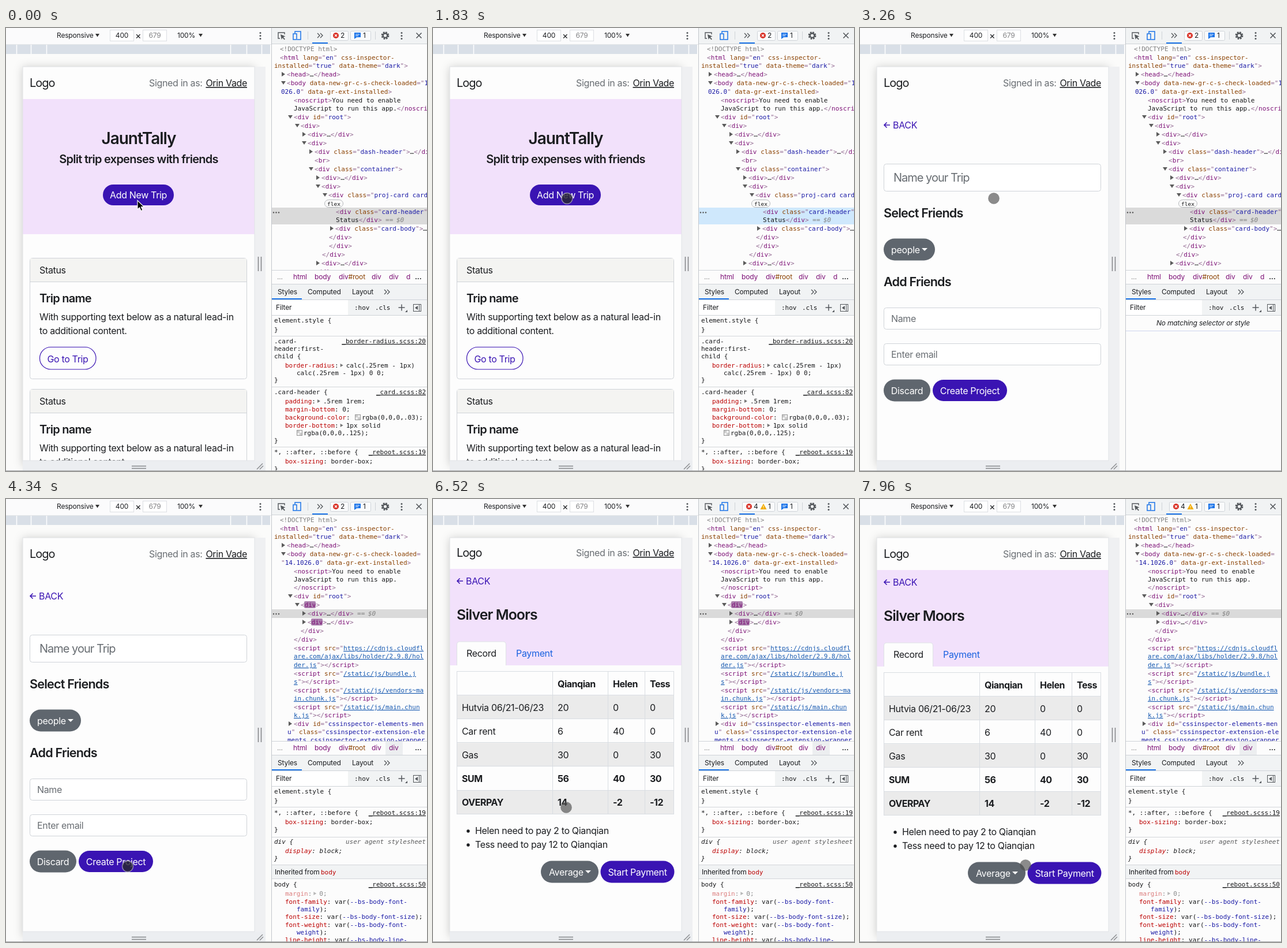
An HTML page for the animation above (8 s loop, 730 px wide and 767 px high).

```html
<!DOCTYPE html>
<html lang="en">
<head>
<meta charset="utf-8">
<title>Trip expenses demo</title>
<style>
html, body { margin: 0; width: 100%; height: 100%; overflow: hidden; background: #fcfcfc; }
svg { display: block; width: 730px; height: 767px; }
text { font: 16px Inter, sans-serif; letter-spacing: -.021em; white-space: pre; fill: #1b1d20; }
.c { text-anchor: middle; }
.e { text-anchor: end; }
.big { font-size: 20px; letter-spacing: -.05em; }
.h { font-weight: 600; letter-spacing: -.037em; }
.b { font-weight: 700; letter-spacing: -.03em; }
.w { fill: #fff; }
.grey { fill: #686d72; }
.ink { fill: #3a14b3; }
.s { font-size: 12px; letter-spacing: -.014em; }
.m { font: 11px "DejaVu Sans Mono", monospace; letter-spacing: 0; fill: #17181a; }
.i { font-style: italic; }
.u { text-decoration: underline; }
.p { fill: #7d1076; } .q { fill: #936a92; } .a { fill: #8a4000; } .v { fill: #1a1aa6; }
.k { fill: #808080; } .l { fill: #1558b0; text-decoration: underline; } .r { fill: #bc0000; } .t { fill: #17181a; }
</style>
</head>
<body>
<script>
const INK = '#3a14b3', SLATE = '#5f666e', EDGE = '#cfd3d8', BAR = '#f1f3f4', BLUE = '#1a73e8', ICON = '#54585c';

const esc = s => s.replace(/&/g, '&amp;').replace(/</g, '&lt;').replace(/>/g, '&gt;');
const text = (x, y, s, cls = '', attrs = '') => `<text x="${x}" y="${y}" class="${cls}" ${attrs}>${s}</text>`;
const rect = (x, y, w, h, fill, attrs = '') => `<rect x="${x}" y="${y}" width="${w}" height="${h}" fill="${fill}" ${attrs}/>`;
const path = (d, fill, attrs = '') => `<path d="${d}" fill="${fill}" ${attrs}/>`;
const line = (d, color = EDGE, w = 1) => path(d, 'none', `stroke="${color}" stroke-width="${w}"`);
const dot = (x, y, r, fill) => `<circle cx="${x}" cy="${y}" r="${r}" fill="${fill}"/>`;
const group = (id, body, attrs = '') => `<g id="${id}" ${attrs}>${body}</g>`;
const box = (x, y, w, h, fill = '#fff', r = 4, stroke = EDGE) =>
  rect(x + .5, y + .5, w - 1, h - 1, fill, `rx="${r}" stroke="${stroke}"`);
const pill = (x, y, w, h, fill) => rect(x, y, w, h, fill, `rx="${h / 2}"`);
const down = (x, y, w, fill) => path(`M${x} ${y}h${w}l${-w / 2} ${w * .8}z`, fill);
const caret = (x, y) => path(`M${x} ${y}h10l-5 5z`, '#fff');
const dots = (x, y) => [-5, 0, 5].map(d => dot(x, y + d, 1.5, ICON)).join('');

// "^x" switches the colour class; punctuation inside tags is paler.
const span = (cls, s) => `<tspan class="${cls}">${esc(s)}</tspan>`;
const paint = (cls, s) => cls !== 'p' ? span(cls, s) :
  s.replace(/[<>\/="]+|[^<>\/="]+/g, w => span(/[<>\/="]/.test(w) ? 'q' : 'p', w));
const code = (x, cy, src, base = 't', cls = '') => text(x, cy + 4,
  (base + src).split('^').map(part => paint(part[0], part.slice(1))).join(''), 'm ' + cls);
const fold = (x, cy, open) => path(open ? `M${x} ${cy - 3}h8l-4 6z` : `M${x + 1} ${cy - 4}l6 4l-6 4z`, '#5c5c5c');
const tree = rows => rows.map(([x, cy, mark, src]) =>
  (mark ? fold(x - 10, cy, mark === 'd') : '') + code(x, cy, src, 'p')).join('');
const more = '^t…^p</div>';
const div = '<div>' + more;
const classed = name => `<div ^aclass^p="^v${name}^p">`;

/* Browser chrome around the page */
function chrome() {
  const cuts = [18, 43, 70, 389, 417, 443];
  return rect(0, 0, 460, 28, '#fbfbfc') + line('M0 28.5H460', '#e4e6e8') +
    text(88, 17, 'Responsive', 's') + down(155, 10, 7, '#333') +
    box(180, 3, 42, 20, '#fff', 0, '#dcdfe3') + text(201, 17, '400', 's c') +
    text(229, 19, '×', 'c') +
    box(237, 3, 42, 20, '#fff', 0, '#dcdfe3') + text(258, 17, '679', 's c', 'fill-opacity=".55"') +
    text(297, 17, '100%', 's') + down(334, 10, 7, '#333') + dots(441, 13.5) +
    rect(0, 29, 458, 16, '#d9dfe7') + line(cuts.map(x => `M${x + .5} 29v16`).join(''), '#fff', 1.5) +
    rect(0, 45, 460, 722, '#fbfbfa') +
    rect(29, 67, 402, 690, '#fff', 'style="filter:drop-shadow(0 1px 8px #0003)"') +
    rect(431, 67, 19, 700, '#eff0f2') + rect(29, 749, 421, 18, '#eceef1') +
    line('M437.5 396v25M442.5 396v25M218 758.5h25M218 762.5h25', '#85878a', 1.6) +
    line('M435 764l10-10M440 764l6-6', '#8f9194', 1.5);
}

/* Screens of the app */
const header = text(41, 102, 'Logo', 'big') + text(248, 101, 'Signed in as:', 'grey') +
  text(418, 101, 'Orin Vade', 'e u');
const back = y => line(`M52 ${y}H42m4.5-4.5l-4.5 4.5l4.5 4.5`, INK, 1.6) + text(57, y + 6, 'BACK', 'ink');
const hero = h => rect(29, 123, 402, h, '#f2e1fb');

function card(y) {
  return box(41, y, 377, 210, '#fdfdfd') +
    rect(42, y + 1, 375, 40, '#f4f4f2') + line(`M41 ${y + 41.5}h377`) +
    text(58, y + 27, 'Status') + text(58, y + 77, 'Trip name', 'big h') +
    text(58, y + 108, 'With supporting text below as a natural lead-in') +
    text(58, y + 132, 'to additional content.') +
    rect(58.5, y + 154.5, 97.5, 38.5, 'none', `rx="19" stroke="${INK}" stroke-width="1.2"`) +
    text(107, y + 180.5, 'Go to Trip', 'c ink');
}

const home = header + hero(234) +
  text(230, 201, 'JauntTally', 'c h', 'style="font-size:28px"') +
  text(230, 234, 'Split trip expenses with friends', 'c h', 'style="font-size:20px"') +
  pill(168, 271, 123, 36, INK) + text(229.5, 295, 'Add New Trip', 'c w') +
  card(398) + card(625);

const form = header + back(168) +
  box(41, 235, 377, 48) + text(58, 266, 'Name your Trip', 'big grey') +
  text(41, 328, 'Select Friends', 'h', 'style="font-size:21.6px"') +
  pill(41, 364.5, 89, 38, SLATE) + text(54, 390, 'people', 'w') + caret(107, 381) +
  text(41, 447, 'Add Friends', 'h', 'style="font-size:21.6px"') +
  box(41, 484, 377, 38) + text(54, 509, 'Name', 'grey') +
  box(41, 546, 377, 38) + text(54, 571, 'Enter email', 'grey') +
  pill(41, 608.5, 81, 38, SLATE) + text(81.5, 634, 'Discard', 'c w') +
  pill(126, 609, 129, 37, INK) + text(190.5, 634, 'Create Project', 'c w');

function record() {
  const rows = [['', 'Qianqian', 'Helen', 'Tess'], ['Hutvia 06/21-06/23', 20, 0, 0], ['Car rent', 6, 40, 0],
    ['Gas', 30, 0, 30], ['SUM', 56, 40, 30], ['OVERPAY', 14, -2, -12]];
  const cols = [41, 207, 303, 367, 417], top = i => 301 + i * 41.1;
  const cells = rows.map((row, i) =>
    (i % 2 ? rect(41, top(i), 377, 41, '#ebebeb') : '') +
    row.map((v, j) => text(cols[j] + 9, top(i) + 26.5, v, i % 4 === 0 || i === 5 ? 'b' : '')).join('')).join('');
  const grid = cols.map(x => `M${x + .5} 300.5V547.5`).join('') +
    [...rows, 0].map((_, i) => `M41 ${Math.round(top(i)) - .5}H418`).join('');
  return header + hero(167) + back(144) +
    text(41, 210.5, 'Silver Moors', 'h', 'style="font-size:24.8px"') +
    path('M41.5 291v-37q0-5 5-5h75q5 0 5 5v37z', '#fdfdfd', 'stroke="#dee2e6"') +
    rect(41, 290, 87, 3, '#fdfdfd') +
    text(58, 275, 'Record') + text(144, 275, 'Payment', '', 'style="fill:#1a62e0"') +
    cells + line(grid, '#d9dde2') +
    dot(61, 577, 2.7, '#1b1d20') + text(73, 582, 'Helen need to pay 2 to Qianqian') +
    dot(61, 601, 2.7, '#1b1d20') + text(73, 606, 'Tess need to pay 12 to Qianqian') +
    pill(187, 628.5, 100, 38, SLATE) + text(201, 653.5, 'Average', 'w') + caret(264, 645) +
    pill(290.5, 628.5, 128, 38, INK) + text(354.5, 653.5, 'Start Payment', 'c w');
}

/* Developer tools */
const chevrons = (x, y) => line(`M${x} ${y - 4}l4 4l-4 4M${x + 5} ${y - 4}l4 4l-4 4`, ICON, 1.4);
const errorMark = x => dot(x, 13, 5, '#d93025') + line(`M${x - 2} 11l4 4m0-4l-4 4`, '#fff', 1.2);

const toolbar = rect(461, 0, 269, 27, BAR) + line('M461 27.5H730') +
  line('M475 18h-3V8h11v3', ICON, 1.4) + path('M476 11l8.5 3.6l-3.6 1.2l3 3.4l-1.3 1.2l-3-3.4l-1.8 3z', ICON) +
  line('M501 9V6h10v14h-6', BLUE, 1.5) + rect(498, 10, 6, 10, BAR, `stroke="${BLUE}" stroke-width="1.5"`) +
  line('M523.5 6v14M640.5 6v14') + rect(531, 25, 27, 2, BLUE) +
  box(597, 5, 36, 17, '#fafbfc', 2) + path('M604 8h11v8h-7l-4 3z', BLUE) +
  line('M606 11h7M606 13.5h5', '#fff') + text(619, 17, '1', 's') +
  `<circle cx="657.5" cy="13" r="5.6" fill="none" stroke="${ICON}" stroke-width="2.6" stroke-dasharray="2.7 1.7"/>` +
  `<circle cx="657.5" cy="13" r="3.8" fill="none" stroke="${ICON}" stroke-width="2.4"/>` +
  dots(686, 13.5) + line('M711.5 8.5l9 9m0-9l-9 9', ICON, 1.6);
const fewErrors = chevrons(540, 13) + box(562, 5, 32, 17, '#fafbfc', 2) + errorMark(572) + text(580, 17, '2', 's');
const manyErrors = box(536, 5, 57, 17, '#fafbfc', 2) + errorMark(548) + text(556, 17, '4', 's') +
  path('M573 8l5.5 10h-11z', '#f2ab00') + line('M573 11.5v3m0 1v1', '#fff') + text(581, 17, '1', 's');

const treeHead = [
  [475, 36, '', '^k<!DOCTYPE html>'],
  [475, 51, '', '<html ^alang^p="^ven^p" ^acss-inspector-'],
  [465, 65, '', '^ainstalled^p="^vtrue^p" ^adata-theme^p="^vdark^p">'],
  [487, 80, 'r', '<head>^t…^p</head>'],
  [499, 125, '', '<noscript>^tYou need to enable']];
const ellipsis = y => [464, 468.5, 473].map(x => dot(x, y, 1.2, '#555')).join('');

const homeTree = rect(461, 311, 269, 29, '#dadada', 'id="selection"') + ellipsis(319.5) + tree([...treeHead,
  [487, 95, 'd', '<body ^adata-new-gr-c-s-check-loaded^p="^v14.1'],
  [477, 110, '', '^v026.0^p" ^adata-gr-ext-installed^p>'],
  [499, 139, '', '^tJavaScript to run this app.^p</noscript>'],
  [499, 154, 'd', '<div ^aid^p="^vroot^p">'],
  [511, 169, 'd', '<div>'], [523, 184, 'r', div], [523, 199, 'd', '<div>'],
  [535, 214, 'r', classed('dash-header') + more],
  [535, 229, '', '<br>'], [535, 244, 'd', classed('container')],
  [547, 259, 'r', div], [547, 274, 'd', '<div>'],
  [559, 289, 'd', classed('proj-card card')],
  [572, 318, '', classed('card-header')],
  [572, 332, '', '^tStatus^p</div>^k == '],
  [571, 347, 'r', classed('card-body') + '^t…'],
  [560, 362, '', '</div>'], [560, 377, '', '</div>'], [548, 392, '', '</div>'],
  [547, 407, 'r', div], [535, 422, '', '</div>']]) +
  code(677, 332, '$0', 'k', 'i') + box(552, 297, 33, 14, '#fafafa', 7, '#b5b8bb') +
  text(568.5, 307.5, 'flex', 'm c', 'style="font-size:9.5px"');

const link = '<script ^asrc^p="^l', close = '^p"></' + 'script>';
const flash = (x, cy) => rect(x + 6, cy - 6, 20, 12, '#894b8d', 'rx="2"');
const pageTree = rect(461, 191, 269, 15, '#dadada') + ellipsis(199) +
  group('flash', flash(511, 183) + flash(523, 213)) + tree([...treeHead,
  [487, 95, 'd', '<body ^adata-new-gr-c-s-check-loaded^p='],
  [477, 110, '', '"^v14.1026.0^p" ^adata-gr-ext-installed^p>'],
  [499, 139, '', '^tJavaScript to run this app.'], [499, 153, '', '</noscript>'],
  [499, 168, 'd', '<div ^aid^p="^vroot^p">'],
  [511, 183, 'd', '<div>'], [523, 198, 'r', div + '^k == '], [523, 213, 'r', div],
  [511, 228, '', '</div>'], [499, 243, '', '</div>'],
  [499, 258, '', link + 'https://cdnjs.cloudfl'],
  [499, 272, '', '^lare.com/ajax/libs/holder/2.9.8/hol'], [499, 287, '', '^lder.js' + close],
  [499, 302, '', link + '/static/js/bundle.j'], [499, 316, '', '^ls' + close],
  [499, 331, '', link + '/static/js/vendors~ma'], [499, 345, '', '^lin.chunk.js' + close],
  [499, 360, '', link + '/static/js/main.chun'], [499, 374, '', '^lk.js' + close],
  [499, 389, 'r', '<div ^aid^p="^vcssinspector-elements-men'],
  [488, 403, '', '^vu^p" ^aclass^p="^vcssinspector-extension-ele'],
  [488, 417, '', '^vments cssinspector-extension-wrapper']]) +
  code(628, 198, '$0', 'k', 'i') +
  group('flashText', code(517.6, 183, 'div', 'w') + code(529.6, 213, 'div', 'w'));

const crumbs = rect(461, 419, 269, 24, '#fcfcfc') + line('M461 419.5H730M461 443.5H730') +
  rect(658, 420, 30, 23, '#eceef0', 'id="crumb"') +
  text(470, 435, '...', 's k') + text(498, 435, 'html', 's p') + text(535, 435, 'body', 's p') +
  text(577, 435, 'div<tspan class="a">#root</tspan>', 's p') + text(634, 435, 'div', 's p') +
  text(664, 435, 'div', 's p') + text(694, 435, 'd', 's p', 'id="cutCrumb"') + text(709, 435, '...', 's b');

const tabs = rect(461, 444, 269, 54, BAR) + rect(461, 471, 132, 26, '#fff') +
  line('M461 470.5H730M461 497.5H730') + rect(461, 468, 52, 2, BLUE) +
  text(471, 461, 'Styles', 's') + text(523, 461, 'Computed', 's') + text(600, 461, 'Layout', 's') +
  chevrons(656, 457) + text(468, 488, 'Filter', 's') +
  code(604, 484, ':hov', 't', 'b') + code(640, 484, '.cls', 't', 'b') +
  line('M680.5 484h11M686 478.5v11', ICON, 1.5) + path('M696 488v4h-4z', ICON) +
  rect(706.5, 478.5, 13, 12, 'none', `stroke="${ICON}"`) + line('M716.5 479v11', ICON) + path('M714 481v7l-5-3.5z', ICON);

const rule = y => line(`M461 ${y + .5}H730`, '#d3d6da');
const brace = y => code(465, y, '}');
const source = (y, s) => text(728, y + 4, s, 'm e u');
const swatch = (x, y) => rect(x + .5, y - 4.5, 9, 9, '#eee', 'stroke="#999"') + path(`M${x + 1} ${y - 4}h4v4h4v4h-4v-4h-4z`, '#ccc');
const small = (x, cy) => path(`M${x} ${cy - 3}l5 3l-5 3z`, '#777');
const prop = (cy, name, value, gap = 0) => code(484, cy, `^r${name}^t:${gap ? '' : ' ' + value}`) +
  (gap ? small(484 + (name.length + 1) * 6.62 + 3, cy) + code(484 + (name.length + 1) * 6.62 + gap, cy, value) : '');
const varStart = s => `var(^v--bs-body-${s}`;
const inline = code(465, 506, 'element.style {') + brace(522) + rule(533);

const cardStyles = inline +
  code(465, 542, '.card-') + source(542, '_border-radius.scss:20') +
  code(465, 555, 'header:first-') + code(465, 568, 'child {') +
  prop(584, 'border-radius', 'calc(.25rem - 1px)', 13) + code(504, 597, 'calc(.25rem - 1px) 0 0;') + brace(609) + rule(621) +
  code(465, 630, '.card-header {') + source(630, '_card.scss:82') +
  prop(646, 'padding', '.5rem 1rem;', 13) + prop(660, 'margin-bottom', '0;') +
  prop(674, 'background-color', '') + swatch(605, 674) + code(617, 674, 'rgba(0,0,0,.03);') +
  prop(688, 'border-bottom', '1px solid', 13) + swatch(504, 701) + code(516, 701, 'rgba(0,0,0,.125);') + brace(714) + rule(725) +
  code(465, 734, '*, ::after, ::before {') + source(734, '_reboot.scss:19') +
  prop(750, 'box-sizing', 'border-box;') + brace(763);

const noStyles = text(595, 515, 'No matching selector or style', 's c i') + line('M461 524.5H730', '#cdd5ee');

const divStyles = inline +
  code(465, 543, '*, ::after, ::before {') + source(543, '_reboot.scss:19') +
  prop(559, 'box-sizing', 'border-box;') + brace(572) + rule(585) +
  code(465, 593, 'div {', 't', 'i') + text(728, 597, 'user agent stylesheet', 'm e i', 'fill-opacity=".7"') +
  code(484, 609, '^rdisplay^t: block;', 't', 'i') + code(465, 622, '}', 't', 'i') +
  rect(461, 633, 269, 25, BAR) + rule(633) + rule(657) +
  text(466, 650, 'Inherited from', 's') + code(546, 646, '^rbody') +
  code(465, 667, 'body {') + source(667, '_reboot.scss:50') +
  `<g opacity=".5">${prop(683, 'margin', '0;', 13)}</g>` +
  prop(697, 'font-family', varStart('font-')) + code(504, 710, '^vfamily^t);') +
  prop(723, 'font-size', varStart('font-size^t);')) +
  prop(737, 'font-weight', varStart('font-')) + code(504, 750, '^vweight^t);') +
  prop(763, 'line-height', varStart('line-'));

const tools = rect(461, 0, 269, 767, '#fcfcfc') +
  group('homeTree', homeTree, 'clip-path="url(#treeClip)"') + group('pageTree', pageTree, 'clip-path="url(#treeClip)"') +
  toolbar + group('fewErrors', fewErrors) + group('manyErrors', manyErrors) + crumbs + tabs +
  group('cardStyles', cardStyles) + group('noStyles', noStyles) + group('divStyles', divStyles) +
  line('M460.5 0V767', '#c3c7cc');

const arrow = path('M228 298.5v15.5l3.6-3.2l2.6 5.8l2.7-1.2l-2.5-5.6h5z', '#000', 'id="arrow" stroke="#fff" stroke-width="1.1"');

document.body.innerHTML = `<svg viewBox="0 0 730 767">
  <clipPath id="pageClip"><rect x="29" y="67" width="402" height="682"/></clipPath>
  <clipPath id="treeClip"><rect x="461" y="28" width="269" height="391"/></clipPath>
  ${chrome()}
  <g clip-path="url(#pageClip)">${rect(29, 67, 402, 682, '#fdfdfd')}
    ${group('home', home)}${group('form', form)}${group('record', record())}</g>
  ${rect(29, 67, 402, 682, 'none', 'stroke="#e1e3e6"')}
  ${tools}${line('M0 766.5H730', '#a2a4a6')}
  <circle id="touch" r="9.5"/>${arrow}</svg>`;

/* Timeline */
const LOOP = 8000;
const touchPath = [[0, 233, 295], [3280, 232, 295], [4100, 211, 636], [5850, 211, 636],
  [6450, 231, 534], [6850, 231, 534], [7700, 287, 634], [LOOP, 287, 634]];
const scrollPath = [[0, 0], [6050, 0], [6200, -2], [6900, -2], [7100, 0], [LOOP, 0]];

function along(keys, t) {
  const i = keys.findIndex(k => k[0] > t), [from, to] = [keys[i - 1], keys[i]];
  const u = (t - from[0]) / (to[0] - from[0]), e = u * u * (3 - 2 * u);
  return from.slice(1).map((v, j) => v + (to[j + 1] - v) * e);
}

const el = id => document.getElementById(id);
const show = (id, on) => { el(id).style.display = on ? '' : 'none'; };
const within = (t, a, b) => t >= a && t < b;

function draw(t) {
  const FORM = 2900, TREE = 3450, RECORD = 5600, UPDATE = 5650;
  show('home', t < FORM);
  show('form', within(t, FORM, RECORD));
  show('record', t >= RECORD);
  show('homeTree', t < TREE);
  show('pageTree', t >= TREE);
  show('crumb', t >= TREE);
  show('cutCrumb', t < TREE);
  show('fewErrors', t < RECORD);
  show('manyErrors', t >= RECORD);
  show('cardStyles', t < 3050);
  show('noStyles', within(t, 3050, TREE));
  show('divStyles', t >= TREE);
  el('selection').setAttribute('fill', within(t, 600, 1950) ? '#cfe8fc' : '#dadada');

  const age = t - (t >= UPDATE ? UPDATE : TREE);
  el('flash').style.opacity = Math.max(0, Math.min(1, 1.25 - age * .00062));
  show('flashText', within(age, 0, 450));

  el('record').setAttribute('transform', `translate(0 ${along(scrollPath, t)[0]})`);
  show('arrow', t < 600);
  show('touch', t >= 600);
  const [x, y] = along(touchPath, t), touch = el('touch');
  const pressed = within(t, 1700, 2800) || within(t, 4250, 6150);
  touch.setAttribute('transform', `translate(${x} ${y})`);
  touch.setAttribute('fill', pressed ? 'rgba(38,38,44,.8)' : 'rgba(80,80,80,.66)');
  touch.setAttribute('stroke', pressed ? 'rgba(165,160,185,.8)' : 'rgba(90,90,90,.35)');
  touch.setAttribute('stroke-width', pressed ? 1.5 : 1);
}

const start = performance.now();
function tick() {
  draw((performance.now() - start) % LOOP);
  requestAnimationFrame(tick);
}
tick();
</script>
</body>
</html>
```
